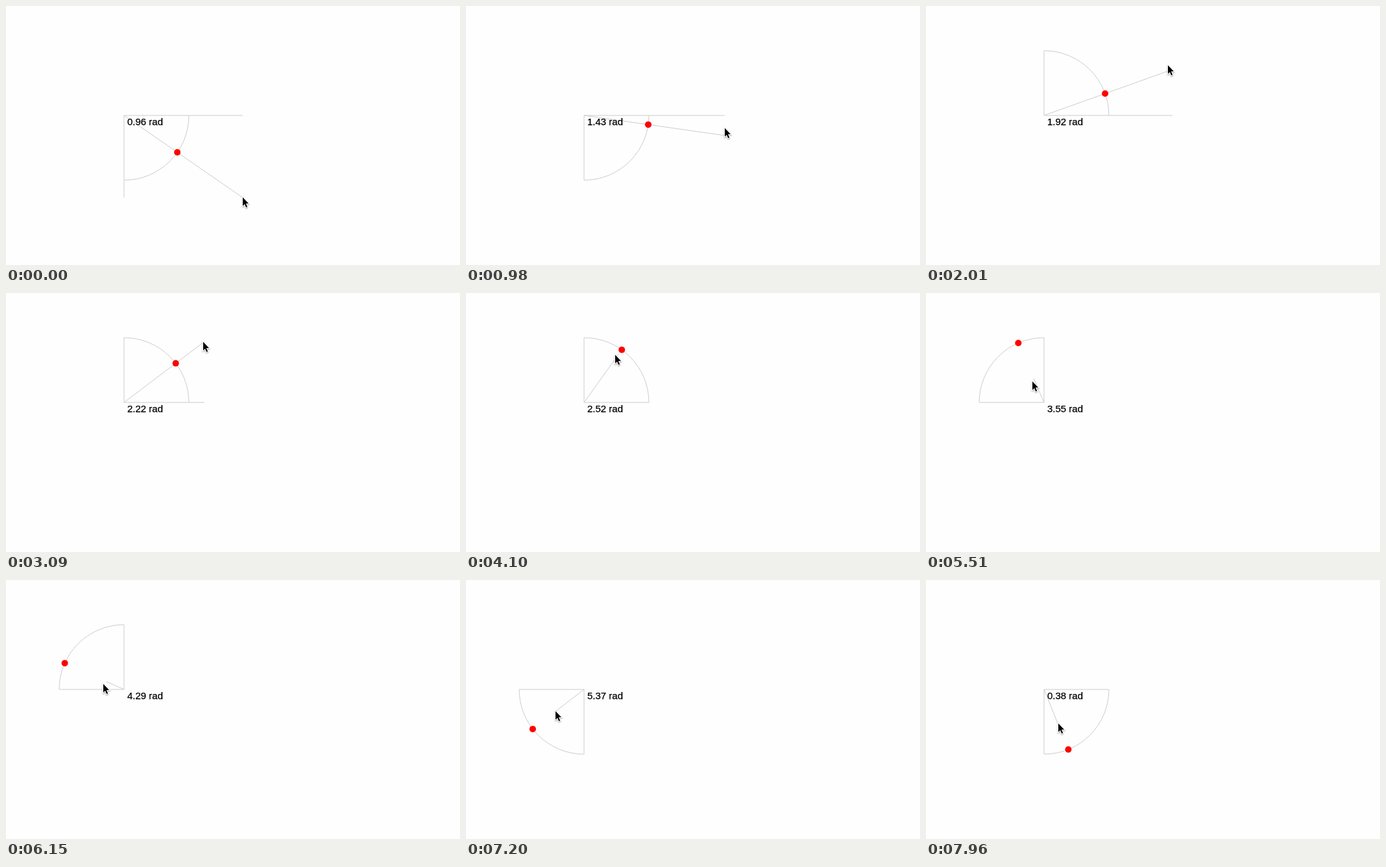
An HTML page with a canvas that plays this animation: 700 by 400 pixels, repeating every 7990 ms.

```html
<!DOCTYPE html>
<html lang="en">
<head>
<meta charset="utf-8">
<title>Angle to pointer</title>
<style>
  html, body { margin: 0; width: 100%; height: 100%; overflow: hidden; background: #fefefe; }
  canvas { display: block; }
</style>
</head>
<body>
<canvas id="stage" width="700" height="400"></canvas>
<script>
const ctx = document.getElementById('stage').getContext('2d');
const LOOP = 7990;
const LAG = 40; // the drawing follows the pointer by one step
const CENTER = { x: 182, y: 169 };
const RADIUS = 100;
const HOME = { x: 365, y: 296 };

// Pointer strokes, with rests between them.
const STROKES = [
  { from: 70, to: 630, x: 400, y: 236 },
  { from: 820, to: 1560, x: 397, y: 115 },
  { from: 1880, to: 2360, x: 347, y: 66 },
  { from: 2650, to: 3420, x: 294, y: 78 },
  { from: 3740, to: 4490, x: 206, y: 103 },
  { from: 4570, to: 5320, x: 172, y: 119 },
  { from: 5370, to: 5900, x: 155, y: 157 },
  { from: 6110, to: 6340, x: 140, y: 170 },
  { from: 6510, to: 7240, x: 138, y: 203 },
  { from: 7320, to: 8040, x: 205, y: 222 }
];

const ARROW = new Path2D('M0 0V13.2L3 10.4L5.2 15.6L7.2 14.7L5 9.6H9Z');

const easeOut = u => u * (2 - u);

function pointerAt(time) {
  let { x, y } = HOME;
  for (const stroke of STROKES) {
    const u = (time - stroke.from) / (stroke.to - stroke.from);
    const progress = easeOut(Math.min(1, Math.max(0, u)));
    x += (stroke.x - x) * progress;
    y += (stroke.y - y) * progress;
  }
  return { x: Math.round(x), y: Math.round(y) };
}

function line(dx, dy) {
  ctx.beginPath();
  ctx.moveTo(0, 0);
  ctx.lineTo(dx, dy);
  ctx.stroke();
}

function drawAngle(target) {
  const dx = target.x - CENTER.x, dy = target.y - CENTER.y;
  const sideX = dx > 0 ? 1 : -1, sideY = dy > 0 ? 1 : -1;
  const angle = (Math.atan2(dx, dy) + 2 * Math.PI) % (2 * Math.PI);

  ctx.save();
  ctx.translate(CENTER.x, CENTER.y);
  ctx.strokeStyle = '#ccc';
  ctx.lineWidth = 1;
  line(sideX * Math.max(RADIUS, Math.abs(dx)), 0);
  line(0, sideY * Math.max(RADIUS, Math.abs(dy)));
  line(dx, dy);

  ctx.beginPath();
  ctx.arc(0, 0, RADIUS, sideX > 0 ? 0 : Math.PI, sideY * Math.PI / 2, sideX !== sideY);
  ctx.stroke();

  ctx.fillStyle = '#f00';
  ctx.beginPath();
  ctx.arc(RADIUS * Math.sin(angle), RADIUS * Math.cos(angle), 5, 0, 2 * Math.PI);
  ctx.fill();

  const label = angle.toFixed(2) + ' rad';
  ctx.font = '15px "Liberation Sans", Arial, sans-serif';
  ctx.fillStyle = ctx.strokeStyle = '#000';
  ctx.lineWidth = 0.25;
  ctx.fillText(label, 5, 15);
  ctx.strokeText(label, 5, 15);
  ctx.restore();
}

function drawPointer({ x, y }) {
  ctx.save();
  ctx.translate(x, y - 0.5);
  ctx.strokeStyle = '#fff';
  ctx.lineWidth = 2;
  ctx.shadowColor = 'rgba(0, 0, 0, 0.4)';
  ctx.shadowBlur = 2;
  ctx.shadowOffsetY = 1;
  ctx.stroke(ARROW);
  ctx.shadowColor = 'transparent';
  ctx.fillStyle = '#000';
  ctx.fill(ARROW);
  ctx.restore();
}

const start = performance.now();

function frame() {
  const t = (performance.now() - start) % LOOP;
  ctx.fillStyle = '#fefefe';
  ctx.fillRect(0, 0, 700, 400);
  drawAngle(pointerAt(t - LAG));
  drawPointer(pointerAt(t));
  requestAnimationFrame(frame);
}

frame();
</script>
</body>
</html>
```
